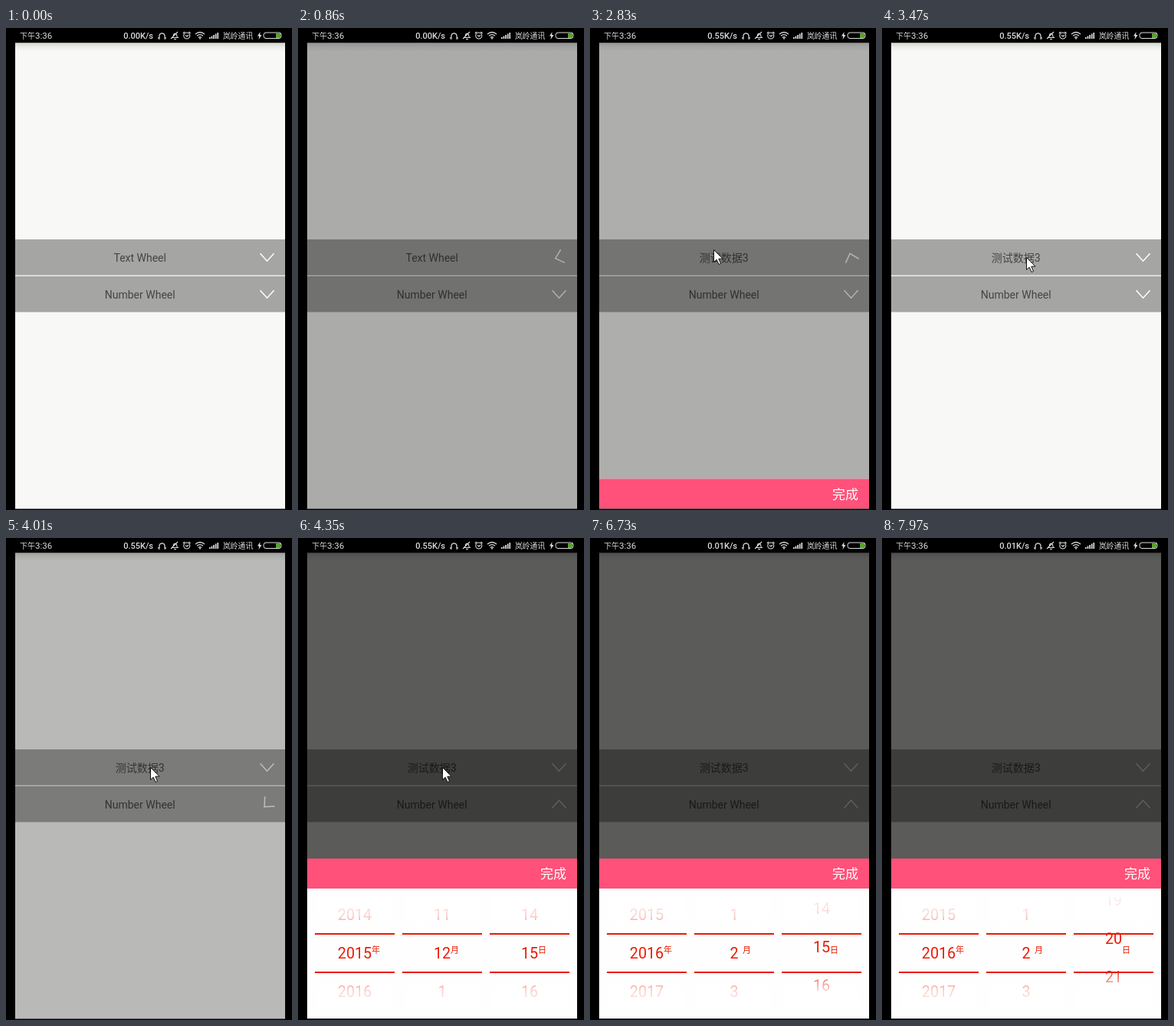
These frames come from a looping animation (373 px wide and 627 px high, 8000 ms). An HTML page with a canvas:

```html
<!DOCTYPE html>
<html lang="zh-CN">
<head>
<meta charset="utf-8">
<style>
  html, body { margin: 0; width: 100%; height: 100%; overflow: hidden; background: #000; }
  canvas { display: block; }
</style>
</head>
<body>
<canvas id="stage" width="373" height="627"></canvas>
<script>
const ctx = document.getElementById('stage').getContext('2d');
const LOOP = 8000, MIDDLE = 540, PANEL_TRAVEL = 208;
const PINK = '#ff5179', RED = '#ea1a02', FONT = 'Roboto, "Noto Sans CJK SC", sans-serif';

const clamp = v => Math.max(0, Math.min(1, v));
const progress = (t, start, duration) => clamp((t - start) / duration);
const smooth = p => (1 - Math.cos(Math.PI * p)) / 2;
const easeOut = (p, power = 2) => 1 - (1 - p) ** power;
const ramp = (t, start, duration) => smooth(progress(t, start, duration));

function rect(x, y, w, h, color) {
  ctx.fillStyle = color;
  ctx.fillRect(x, y, w, h);
}

function text(str, x, y, size, color, align = 'center', weight = 400) {
  ctx.font = `${weight} ${size}px ${FONT}`;
  ctx.textAlign = align;
  ctx.textBaseline = 'alphabetic';
  ctx.fillStyle = color;
  ctx.fillText(str, x, y + size * 0.36);
}

function stroke(path, width = 1, color = '#ddd') {
  ctx.strokeStyle = color;
  ctx.lineWidth = width;
  ctx.stroke(new Path2D(path));
}

function gradient(x0, y0, x1, y1, stops) {
  const g = ctx.createLinearGradient(x0, y0, x1, y1);
  stops.forEach((color, i) => g.addColorStop(i / (stops.length - 1), color));
  return g;
}

const white = alpha => `rgba(255,255,255,${alpha})`;

function drawStatusBar(t) {
  const speed = t < 1800 ? '0.00' : t < 5670 ? '0.55' : '0.01';
  text('下午', 18, 10, 10, '#ddd', 'left');
  text('3:36', 38, 10, 11.5, '#ddd', 'left');
  text(speed + 'K/s', 192, 10, 11, '#ddd', 'right', 500);
  // headset, muted bell, alarm clock
  stroke('M200 13V9.500a3.700 4 0 0 1 7 0V13M199 12v2h2M208 12v2h-2', 1.2);
  stroke('M217 12.500q1.500-1 1.500-4a2.500 3 0 0 1 4 0q0 3 1.500 4zM219 14.500h3M215 14l9-9', 1.1);
  stroke('M231.800 10a4 4 0 1 0 8 0a4 4 0 1 0-8 0M234 9.500l2 1.500 2-2M231 7l2-2M240.500 7l-2-2', 1.1);
  stroke('M247 8q6-5 12 0M249 10.300q4-3.300 8 0M251 12.500q2-1.700 4 0', 1.3);
  rect(252.200, 12.800, 1.700, 1.700, '#ddd');
  for (let i = 0; i < 5; i++) rect(265 + i * 2.6, 12 - i * 1.5, 1.700, 2 + i * 1.5, '#ddd');
  text('岚岭通讯', 283, 10, 9.8, '#ddd', 'left', 500);
  ctx.fillStyle = '#ddd';
  ctx.fill(new Path2D('M331.500 5l-3.500 5.500h2.200l-.700 4.500 4-6h-2.400z'));
  stroke('M339 6h17a3 3 0 0 1 3 3v1.500a3 3 0 0 1-3 3h-17a3 3 0 0 1-3-3V9a3 3 0 0 1 3-3z');
  rect(352, 7, 6, 6, '#55a626');
}

function drawRow(y, label, turn) {
  rect(12, y, 352, 46.500, '#a5a5a3');
  text(label, 174.700, y + 23.500, 14, '#454545');
  ctx.save();
  ctx.translate(340.500, y + 23.200);
  ctx.rotate(turn * Math.PI);
  stroke('M-9-5L0 5L9-5', 1.500, '#fff');
  ctx.restore();
}

// Scrolling column whose ends fade to white towards the clip edges
function drawWheel({ x, width, half, fade, step, pos, size, weight, color, label, stops }) {
  ctx.save();
  ctx.beginPath();
  ctx.rect(x - width / 2, MIDDLE - half, width, half * 2);
  ctx.clip();
  const near = Math.round(pos);
  for (let i = near - 2; i <= near + 2; i++) {
    text(label(i), x, MIDDLE + (i - pos) * step, size, color, 'center', weight);
  }
  for (const side of [-1, 1]) {
    const edge = MIDDLE + side * half, inner = edge - side * fade;
    rect(x - width / 2, Math.min(edge, inner), width, fade,
      gradient(0, edge, 0, inner, stops.map(white)));
  }
  ctx.restore();
}

function drawTextPicker(t) {
  drawWheel({
    x: 187.500, width: 110, half: 61, fade: 43, step: 26.300, size: 19.600, weight: 700, color: '#f84f78',
    pos: 1 + 2 * easeOut(progress(t, 1650, 730), 2.5),
    label: i => i > 0 ? '测试数据' + i : '', stops: [0.85, 0]
  });
  rect(14, 553, 348, 1, gradient(14, 0, 362, 0, [white(0), '#aaa', '#888', '#aaa', white(0)]));
}

function drawDatePicker(t) {
  const nudge = (start, amount) => t >= start ? amount : 0;
  const scroll = (first, start, duration, end) => first + (end - first) * ramp(t, start, duration);
  const columns = [
    [74, '年', scroll(nudge(4660, 0.06), 4990, 500, 1), i => 2015 + i],
    [188, '月', scroll(nudge(5670, 0.1), 5930, 630, 2), i => (i + 23) % 12 + 1],
    [302, '日', scroll(nudge(6730, 0.16), 7050, 720, 5.5) - 0.5 * ramp(t, 7770, 600), i => 15 + i]
  ];
  columns.forEach(([x, unit, pos, label], i) => {
    drawWheel({
      x, width: 100, half: 73, fade: 48, step: 50, size: 19.700, weight: 400, color: RED,
      pos, label, stops: [0.94, 0.81, 0.25]
    });
    text(unit, [96, 199, 313][i], 536, 11, RED, 'left');
    for (const y of [514, 564]) rect(22 + i * 114, y, 104, 2, RED);
  });
}

function drawPanel(t, shown) {
  if (shown <= 0) return;
  ctx.save();
  ctx.beginPath();
  ctx.rect(12, 19, 352, 606);
  ctx.clip();
  ctx.translate(0, PANEL_TRAVEL * (1 - shown));
  rect(12, 417, 352, 208, '#fefefe');
  rect(12, 417, 352, 39, PINK);
  text('完成', 350, 437, 17, '#fff', 'right');
  (t < 3500 ? drawTextPicker : drawDatePicker)(t);
  ctx.restore();
}

function drawCursor(t) {
  let x, y;
  if (t < 1500 || t >= 5980 || (t >= 3290 && t < 3470)) return;
  if (t < 1680) [x, y] = [255, 360];
  else if (t < 3290) {
    const p = ramp(t, 2540, 260);
    [x, y] = [253 - 92 * p, 352 - 64 * p];
  } else [x, y] = [188, 298];
  ctx.save();
  ctx.translate(x + 0.500, y + 0.500);
  const arrow = new Path2D('M0 0V16L3.700 12.700L6.500 19L9 18L6.300 11.700H11.500Z');
  ctx.fillStyle = '#fff';
  ctx.fill(arrow);
  ctx.strokeStyle = '#111';
  ctx.lineWidth = 1;
  ctx.stroke(arrow);
  ctx.restore();
}

function draw(t) {
  const firstTurn = ramp(t, 685, 400) - ramp(t, 2740, 450);
  const secondTurn = ramp(t, 3877, 400);
  const dim = ramp(t, 712, 300) - ramp(t, 2675, 300) + ramp(t, 3880, 300);
  const shown = easeOut(progress(t, 880, 570)) - ramp(t, 2530, 420) + easeOut(progress(t, 4015, 335));

  rect(0, 0, 373, 627, '#000');
  rect(12, 19.500, 352, 606, '#f8f8f6');
  rect(12, 19.500, 352, 11, gradient(0, 19.500, 0, 30.500, ['#d6d6d3', '#ecece9', '#f8f8f6']));
  rect(12, 275, 352, 94.500, '#ececea');
  drawRow(275, t < 2550 ? 'Text Wheel' : '测试数据3', firstTurn);
  drawRow(323, 'Number Wheel', secondTurn);
  rect(12, 19, 352, 607, `rgba(0,0,0,${0.633 * dim})`);
  drawPanel(t, shown);
  drawStatusBar(t);
  drawCursor(t);
}

function tick() {
  draw(performance.now() % LOOP);
  requestAnimationFrame(tick);
}
tick();
</script>
</body>
</html>
```
